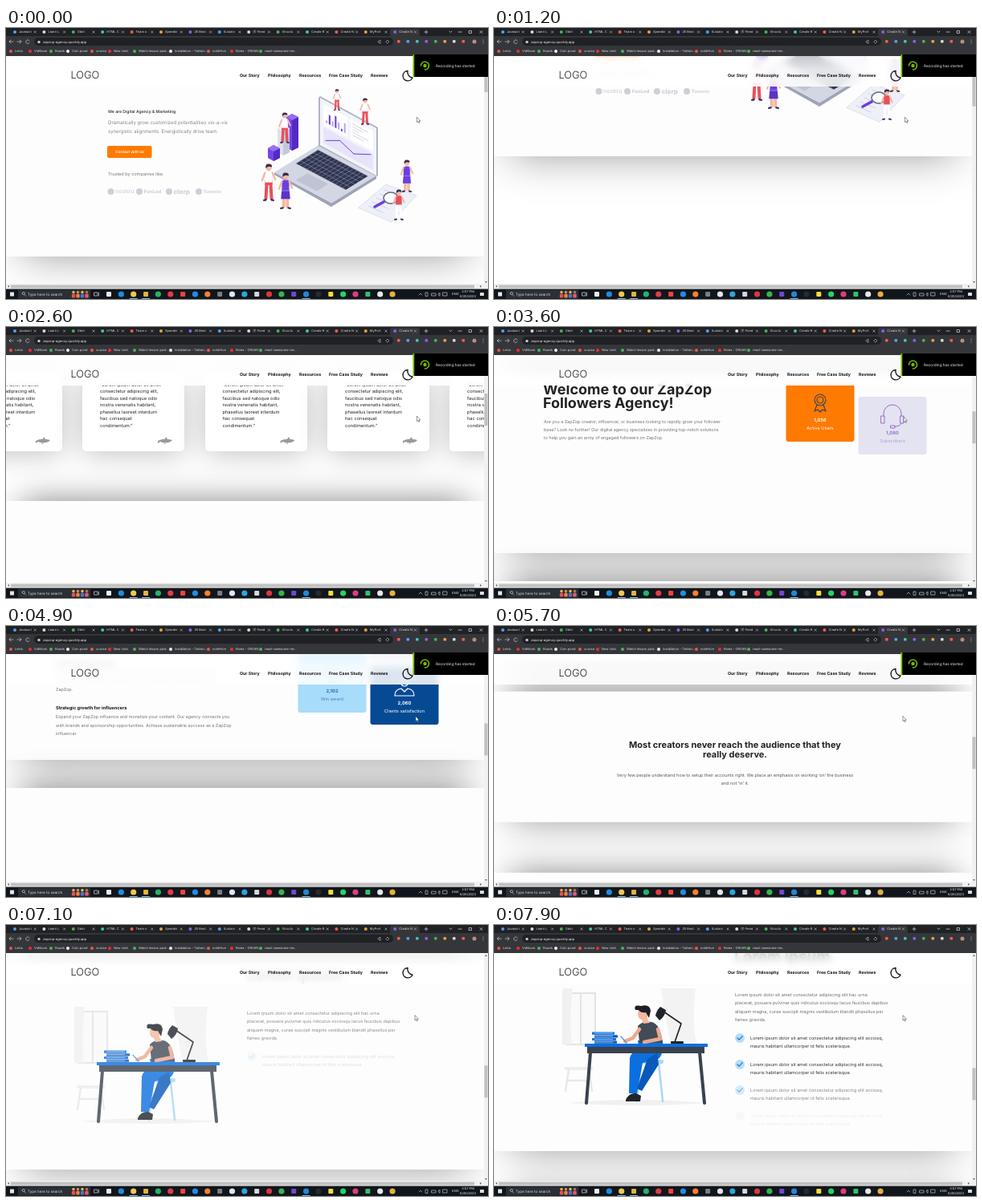
Animation of 600 by 338 pixels, one loop 8000 ms. Source, as an HTML page:

```html
<!DOCTYPE html>
<html lang="en">
<head>
<meta charset="utf-8">
<title>Agency page scroll</title>
<style>
html, body { margin: 0; width: 100%; height: 100%; overflow: hidden; background: #fff; }
#stage { position: relative; width: 600px; height: 338px; overflow: hidden; }
svg { position: absolute; left: 0; top: 0; overflow: visible; font-family: Inter, "Open Sans", sans-serif; text-rendering: geometricPrecision; }
#view { position: absolute; left: 0; top: 35px; width: 595px; height: 284px; overflow: hidden; background: #fff; }
#page { position: absolute; left: 0; top: -35px; width: 595px; }
.sec { position: absolute; left: 0; width: 595px; background: #fdfdfd;
  box-shadow: 0 20px 50px -20px rgba(0,0,0,.38), 0 -20px 40px -20px rgba(0,0,0,.45); }
.card { position: absolute; top: 362px; width: 127px; height: 98px; border-radius: 5px; background: #fff; box-shadow: 0 4px 34px rgba(0,0,0,.24); }
#head { position: absolute; left: 0; top: 35px; width: 595px; height: 38px;
  background: linear-gradient(rgba(255,255,255,.7), rgba(255,255,255,.86) 45%); backdrop-filter: blur(4px); }
</style>
</head>
<body>
<div id="stage">
  <div id="view"><div id="page"></div></div>
  <div id="head"></div>
  <svg id="ui" width="600" height="338"></svg>
</div>
<script>
const $ = id => document.getElementById(id);
const T = (x, y, s, size, fill = '#222', weight = 400, anchor = 'start') =>
  `<text x="${x}" y="${y + size * .34}" font-size="${size}" fill="${fill}" font-weight="${weight}" text-anchor="${anchor}">${s}</text>`;
const lines = (x, y, step, list, ...style) => list.map((s, i) => T(x, y + i * step, s, ...style)).join('');
const R = (x, y, w, h, fill, rx = 0) => `<rect x="${x}" y="${y}" width="${w}" height="${h}" rx="${rx}" fill="${fill}"/>`;
const C = (x, y, r, fill) => `<circle cx="${x}" cy="${y}" r="${r}" fill="${fill}"/>`;
const P = (d, fill, stroke = 'none', w = 1) =>
  `<path d="${d}" fill="${fill}" stroke="${stroke}" stroke-width="${w}" stroke-linecap="round" stroke-linejoin="round"/>`;
const line = (d, stroke, w = 1) => P(d, 'none', stroke, w);
const at = (y, s) => `<g transform="translate(0 ${y})">${s}</g>`;
const reveal = (start, time, s) => `<g class="fade" data-start="${start}" data-time="${time}">${s}</g>`;
const count = (start, rate) => `<tspan class="count" data-start="${start}" data-rate="${rate}">0</tspan>`;
const range = (n, f) => Array.from({ length: n }, (_, i) => f(i)).join('');

// Places unit coordinates on a slanted plane.
const plane = (ox, oy, ux, uy, vx, vy) => {
  const pt = (u, v) => `${(ox + u * ux + v * vx).toFixed(1)} ${(oy + u * uy + v * vy).toFixed(1)}`;
  return {
    quad: (u, v, w, h, fill) => P(`M${pt(u, v)}L${pt(u + w, v)}L${pt(u + w, v + h)}L${pt(u, v + h)}Z`, fill),
    seg: (a, b, c, d, color, w) => line(`M${pt(a, b)}L${pt(c, d)}`, color, w)
  };
};

const skin = '#f4b8a2', purple = '#6c3fe0', red = '#e8505b';
const person = (x, y, h, top, legs, skirt) => `<g transform="translate(${x} ${y}) scale(${h / 40})">`
  + line(skirt ? 'M-2 24L-2 37M2 24L2 37' : 'M-2 20L-3 37M2 20L3 37', skirt ? skin : legs, 3.4)
  + P(skirt ? 'M-4 18L4 18L5 29L-5 29Z' : 'M-4 18L4 18L4 23L-4 23Z', legs)
  + P('M-4 9Q0 7 4 9L4 20L-4 20Z', top, '#d9dbe8', .4)
  + line('M-4 10L-7 18M4 10L7 17', skin, 2)
  + line('M-3 38.5L-5 39M3 38.5L5 39', '#3b3560', 2)
  + C(0, 4.5, 3.1, skin) + P('M-3.3 5Q-3.5 0 0 .5Q4 .5 3.3 4Q0 2 -3.3 5Z', '#3a2a4a') + '</g>';

function laptop() {
  const base = plane(389, 146, 72, 38, -55, 34), scr = plane(391, 87, 70, 38, 0, 59);
  const bar = (x, y, h, a, b, c) => P(`M${x} ${y}l7 -4l8 4v${h}l-8 4l-7 -4z`, a)
    + P(`M${x + 7} ${y + 4}l8 -4v${h}l-8 4z`, b) + P(`M${x} ${y}l7 -4l8 4l-8 4z`, c);
  return bar(349, 111, 38, '#7446ea', '#5429c4', '#9470f5') + bar(338, 125, 30, '#dfe1ec', '#c5c8d8', '#eef0f6')
    + bar(326, 150, 12, '#7446ea', '#5429c4', '#9470f5')
    + P('M334 180L334 183L405 223L461 188L461 184L405 218Z', '#9ea3b8')
    + base.quad(0, 0, 1, 1, '#d3d6e3') + base.quad(.07, .1, .86, .5, '#2f3550')
    + range(14, i => base.seg(.07 + i * .0615, .1, .07 + i * .0615, .6, '#9aa0b8', .5))
    + range(6, i => base.seg(.07, .1 + i * .1, .93, .1 + i * .1, '#9aa0b8', .5))
    + base.quad(.32, .67, .36, .26, '#bfc3d4')
    + P('M391 85L463 124L463 185L459 184L389 147L389 87Z', '#aeb3c6')
    + scr.quad(0, 0, 1, 1, '#f3f4fa') + scr.quad(.06, .1, .43, .42, '#fff') + scr.quad(.54, .1, .4, .42, '#fff')
    + scr.quad(.06, .58, .88, .34, '#e7e3fb')
    + range(7, i => scr.quad(.1 + i * .054, .46 - .05 * (i * 3 % 5 + 1), .03, .05 * (i * 3 % 5 + 1), i % 2 ? purple : '#b9a5f3'))
    + range(5, i => scr.seg(.58, .18 + i * .06, .85 - i % 3 * .08, .18 + i * .06, '#bcc0d5', .7))
    + scr.seg(.1, .84, .35, .68, purple, 1) + scr.seg(.35, .68, .6, .8, purple, 1) + scr.seg(.6, .8, .9, .62, purple, 1)
    + P('M439 224L473 195L511 209L480 242Z', '#eef0f7', '#d0d4e2', .7)
    + range(5, i => line(`M${451 + i * 5} ${222 - i * 5}l${18 + i} 8`, '#cbbdf3', .7))
    + line('M470 217L459 223', purple, 3.6) + P('M470 212a9 7 0 1 0 18 0a9 7 0 1 0 -18 0', '#fff', '#656b87', 1.6)
    + person(412, 76, 27, '#fff', red) + person(447, 87, 34, '#fff', red) + person(347, 105, 39, '#fff', red)
    + person(499, 164, 41, purple, purple, 1) + person(327, 169, 47, '#fff', red)
    + person(348, 180, 46, purple, '#5a33c8', 1) + person(489, 201, 39, red, '#fff');
}

const grey = '#cdd0da';
const partner = (x, name, size, weight) => C(x, 204, 4, grey) + T(x + 5.5, 204, name, size, grey, weight);
const hero = T(127, 104, 'We are Digital Agency &amp; Marketing', 5.1, '#222', 500)
  + lines(127, 118, 11, ['Dramatically grow customized potentialities vis-a-vis', 'synergistic alignments. Energistically drive team.'], 6.1, '#666', 300)
  + R(126, 147, 55.5, 15, '#ff7a00', 2) + T(154, 154.5, 'Contact with us', 4.7, '#fff', 600, 'middle')
  + T(127, 182, 'Trusted by companies like:', 5.6, '#555', 300)
  + partner(130.5, 'nookru', 7, 500) + partner(166, 'FunLod', 6, 800) + partner(203, 'clorp', 8, 800) + partner(240, 'Tunevio', 5.8, 700)
  + laptop();

const shark = x => `<g transform="translate(${x} 142)">` + P('M-9 0Q-2 -4 9 -1L7 1Q0 4 -6 1L-9 3Z M-1 -2L2 -5L3 -1Z M0 2L-2 4.5L3 2Z', '#9a9a9a') + '</g>';
const cardX = [-57, 95, 247.5, 400, 552];
const quote = ['“Lorem ipsum dolor sit amet', 'consectetur adipiscing elit,', 'faucibus sed natoque odio', 'nostra venenatis habitant,',
  'phasellus laoreet interdum', 'hac consequat', 'condimentum.”'];
const quotes = cardX.map(x => lines(x + 22, 72, 8.5, quote, 5.7, '#222') + shark(x + 103)).join('');

const stat = (x, y, bg, ink, n, label, icon, soft = ink) => R(x, y, 85, 72, bg, 3)
  + `<g transform="translate(${x + 42.5} ${y + 24})">${icon}</g>` + T(x + 42.5, y + 45, n, 5.8, ink, 700, 'middle') + T(x + 42.5, y + 55, label, 5.6, soft, 400, 'middle');
const medal = line('M-7 -4a7 7 0 1 0 14 0a7 7 0 1 0 -14 0M-4 -4a4 4 0 1 0 8 0a4 4 0 1 0 -8 0M-4 2L-7 10L-3 8L0 11L3 8L7 10L4 2', '#33415c', 1.1);
const headset = line('M-11 0V-3A11 11 0 0 1 11 -3V0M-14 0h4v9h-4zM10 0h4v9h-4zM11 9Q10 13 3 13M-2 12h5v3h-5z', '#8a4fc0', 1);
const trophy = line('M-6 -7H6V-1Q5 5 0 5Q-5 5 -6 -1ZM-6 -5H-10Q-9 1 -5 1M6 -5H10Q9 1 5 1M0 5V9M-5 10H5', '#3478c0', 1);
const client = line('M-5 -6a5 6 0 1 0 10 0a5 6 0 1 0 -10 0M-12 12Q-12 4 -4 3L0 7L4 3Q12 4 12 12Z', '#fff', 1.2);
const body = '#707070';
const welcome = reveal(2800, 400, lines(61, 78, 17, ['Welcome to our ZapZop', 'Followers Agency!'], 18, '#222', 700)
    + lines(62, 118, 10.2, ['Are you a ZapZop creator, influencer, or business looking to rapidly grow your follower',
      'base? Look no further! Our digital agency specializes in providing top-notch solutions',
      'to help you gain an army of engaged followers on ZapZop.'], 5.4, body))
  + reveal(2900, 500, stat(363.5, 71, '#ff7a00', '#fff', count(3000, 1.76), 'Active Users', medal))
  + reveal(3100, 600, stat(453.5, 87, '#dfdff0', '#7f55b4', count(3000, 1.8), 'Subscribers', headset, '#a58fc8'))
  + reveal(3700, 500, T(62, 163, 'Custom-tailored strategies', 5.7, '#111', 700)
    + lines(62, 173.5, 10.3, ['We know every creator is different. Our team plans each campaign around your', 'goals, your niche and your audience so you can stand out and grow faster on', 'ZapZop.'], 5.4, body))
  + reveal(3700, 500, stat(363.5, 151, '#a8dcfb', '#2869b4', count(3700, 1.7517), 'Win award', trophy, '#5484ad'))
  + reveal(3900, 500, stat(453.5, 166, '#064a94', '#fff', count(3700, 1.7167), 'Clients satisfaction', client))
  + reveal(4100, 500, T(62, 217.5, 'Strategic growth for influencers', 5.7, '#111', 700)
    + lines(62, 228.5, 10.3, ['Expand your ZapZop influence and monetize your content. Our agency connects you',
      'with brands and sponsorship opportunities. Achieve sustainable success as a ZapZop', 'influencer.'], 5.4, body));

const problem = lines(300, 49, 12, ['Most creators never reach the audience that they', 'really deserve.'], 11, '#222', 700, 'middle')
  + lines(300, 86, 10.5, ['Very few people understand how to setup their accounts right. We place an emphasis on working ‘on’ the business', 'and not ‘in’ it.'], 5.45, '#555', 400, 'middle');

const blue = '#0b6fe0', dark = '#39424d';
const desk = P('M90 85H126V149H90Z', '#fafafa', '#e3e3e3', 2) + line('M108 85V149', '#e3e3e3', 2)
  + P('M208 79H251Q246 120 252 148H220Q212 110 208 79Z', '#f3f3f3') + P('M85 79H98Q93 120 97 149H85Z', '#f1f1f1')
  + P('M92 222Q176 214 262 222Q176 228 92 222Z', '#f0f0f0')
  + R(88, 177, 35, 4, '#ededed') + line('M93 181L89 207M118 181L122 207M92 194H119', '#e8e8e8', 2.5)
  + line('M183 172L178 220M205 172L210 220', '#a9d8f5', 2.5) + R(177, 168, 34, 5, '#a9d8f5', 2)
  + P('M179 144H210Q212 165 201 169L185 172L178 210H168L169 166Q170 158 181 157Z', blue)
  + P('M203 160L191 167L178 204L184 207L205 174Z', '#0959b8')
  + P('M164 218Q168 209 177 210L183 213L182 220H164Z', '#20242b')
  + P('M179 126Q186 119 196 121Q207 123 210 147H181Z', '#424b58')
  + line('M181 130L173 141L163 145M204 130L207 142L187 146', '#eba98e', 4.5)
  + P('M180 103H191V117L194 122L186 123L184 118Q177 117 180 103Z', '#f4b99e')
  + P('M176 106Q173 99 183 101Q194 98 195 107L193 116L189 109Q183 110 180 106Z', '#1d2027')
  + line('M158 139L165 147', '#4b92df', 1.2)
  + R(113, 148, 153, 4, blue) + R(116, 152, 146, 8, dark) + line('M120 159L115 222M256 159L262 222', dark, 4)
  + range(4, i => R(122 + i % 2 * 3, 133.5 + i * 3.7, 28 + i % 3, 3.2, i % 2 ? '#0959b8' : blue, .6) + R(125, 134.6 + i * 3.7, 23, .7, '#bfdcfb'))
  + line('M211 108L233 123L225 146', '#20242b', 1.7) + P('M207 102L214 106Q213 114 206 119L201 113Q202 107 207 102Z', '#20242b') + R(220, 145, 16, 3, '#20242b', 1);
const item = (y, start) => reveal(start, 700, C(306, y, 6, '#b8def7') + line(`M303 ${y}l2.2 2.2l4 -4.5`, '#1874c7', 1.2)
  + lines(319, y, 10, ['Lorem ipsum dolor sit amet consectetur adipiscing elit sociosq,', 'mauris habitant ullamcorper id felis scelerisque.'], 5.55, '#333'));
const about = reveal(6700, 500, desk)
  + reveal(6700, 500, T(299, 40, 'Lorem ipsum', 19, '#222', 700)
    + lines(300, 87, 10.4, ['Lorem ipsum dolor sit amet consectetur adipiscing elit hac urna', 'placerat, posuere pulvinar quis ridiculus sociosqu lacus faucibus dapibus',
      'aliquam magna, curae suscipit magnis vestibulum blandit phasellus per', 'fames gravida.'], 5.5, body))
  + item(141, 7000) + item(174, 7200) + item(206, 7500) + item(238, 7850);

const section = (y, h) => `<div class="sec" style="top:${y}px;height:${h}px"></div>`;
$('page').innerHTML = section(35, 250)
  + `<div class="fade" data-start="1300" data-time="500">${cardX.map(x => `<div class="card" style="left:${x}px"></div>`).join('')}</div>`
  + section(522, 223) + section(780, 163) + section(1006, 259) + section(1320, 250)
  + '<svg width="595" height="1600">' + hero + at(305, reveal(1300, 500, quotes)) + at(463, welcome)
  + at(798, reveal(5200, 500, problem)) + at(983, about) + '</svg>';

const hues = ['#4da3ff', '#e8a33a', '#3dc8b4', '#d9d9d9', '#8a62e8', '#ff5b4f', '#46b35a'];
const tabs = ['Javascri', 'Learn L', 'Odel', 'HTML C', 'Team o', 'Speedin', '25 Best', 'Sustain', '(1) Feed', 'Structu', 'Create R', 'Create N', 'MyPort', 'Create N'];
const marks = [[11, 'Letra'], [35, 'VidNook'], [61, 'Roads'], [82, 'Coin pond'], [112, 'course'], [134, 'New chat'], [165, 'Watch lesson pwd...'],
  [210, 'Installation - Tailwin...'], [257, 'noteHive'], [286, 'Roles - ORVAN'], [322, 'react-awesome-rev...']];
const ico = '#c4c7cc';
const browser = R(0, 0, 600, 10, '#202124') + R(478, 1, 37, 10, '#35363a', 2) + R(0, 10, 600, 25, '#35363a')
  + tabs.map((s, i) => { const x = 11 + i * 36.4; return C(x, 5, 2, hues[i * 3 % 7]) + T(x + 5, 5, s, 4, '#dadce0') + line(`M${x + 24} 3.8l2.4 2.4m0 -2.4l-2.4 2.4`, ico, .6); }).join('')
  + line('M521 5h4m-2 -2v4M552 4l1.5 1.5l1.5 -1.5M563 5h4M576.5 3.5h3v3h-3zM590 3.5l3 3m0 -3l-3 3', '#ddd', .7)
  + line('M9 17H4l2 -2m-2 2l2 2M14 17h5l-2 -2m2 2l-2 2M29 16a2.3 2.3 0 1 0 0 2.4', ico, .7)
  + R(35, 12, 447, 10, '#202124', 5) + R(39.5, 16, 3, 3, ico, .5)
  + T(46, 17.2, 'zapzop-agency.quorbly.app', 4.1, '#f1f3f4')
  + line('M463 17l3 -2v4zM473 17l2 -2l2 2l-2 2z', ico, .6)
  + range(8, i => R(487 + i * 11.5, 15, 3.6, 3.6, hues[(i * 2 + 5) % 7], 1)) + C(583, 17, 2.5, '#b88f78') + line('M594 15v.1m0 1.9v.1m0 1.9v.1', ico, .9)
  + marks.map(([x, s], i) => C(x - 5, 29, 2, ['#e9574c', '#ff2929', '#45b463', '#f0f0f0'][i % 4]) + T(x, 29, s, 4, '#dadce0')).join('');

const nav = [[291, 'Our Story'], [326, 'Philosophy'], [365, 'Resources'], [402, 'Free Case Study'], [454, 'Reviews']];
const header = T(80.5, 59, 'LOGO', 12.8, '#222', 300) + nav.map(([x, s]) => T(x, 59, s, 5.25, '#111', 700)).join('')
  + line('M500 53.5A6.2 6.2 0 1 0 506 62A6.8 6.8 0 0 1 500 53.5Z', '#161616', 1.4);

const appX = i => 128 + i * 15.35;
const appHues = ['#e9edf0', '#1b8fe0', '#f3c64d', '#e3b33b', '#20b36a', '#e33b42', '#f0443e', '#1f8ce8', '#ff7f2a', '#7b7f85', '#dfe7ee', '#2ea5e0',
  '#d8d8d8', '#e0343f', '#37b64a', '#7346d1', '#2189d8', '#262b31', '#f7de34', '#25d366', '#e23c7c', '#2fc46c', '#e8e8e8', '#e8b03b'];
const taskbar = R(0, 325.5, 600, 13, '#11161c') + R(5, 329.5, 5, 5, '#e5e5e5') + R(15, 326.5, 90, 11, '#2b3036')
  + line('M20.2 331a1.6 1.6 0 1 0 3.2 0a1.6 1.6 0 1 0 -3.2 0M23 332.5l1.5 1.7', '#ddd', .6) + T(27, 332, 'Type here to search', 4.6, '#ddd')
  + range(4, i => C(84 + i * 5.5, 329.5, 1.7, ['#f3b04e', '#d98662', '#f4bd3f', '#b97450'][i]) + R(81.8 + i * 5.5, 331.5, 4.4, 5, ['#ef4d54', '#e7863b', '#4f70cf', '#e75a71'][i], 1.5))
  + line('M110 330h4v4h-4zM115.5 330v4', '#ddd', .7)
  + appHues.map((f, i) => i % 3 ? C(appX(i), 332, 3.6, f) : R(appX(i) - 3, 329, 6, 6, f, 1)).join('')
  + range(3, i => R(appX([2, 3, 16][i]) - 5, 337, 10, 1, '#76b9ed'))
  + line('M514 333l2 -2l2 2M522 334v-4h3v4zM530 331h5v3h-5zM538 332l2 -2v4zM544 330h5v4h-5z', '#ddd', .6)
  + T(559.5, 332, 'ENG', 4, '#eee', 400, 'middle') + T(575, 329, '3:57 PM', 4, '#eee', 400, 'middle') + T(575, 335, '6/25/2023', 4, '#eee', 400, 'middle') + R(590, 330, 5, 4, '#ddd', .6);

$('ui').innerHTML = browser + header
  + R(595, 35, 5, 284, '#f1f1f1') + P('M596 39l1.5 -2l1.5 2zM596 316l1.5 2l1.5 -2z', '#666') + `<g id="thumb">${R(595.5, 40, 4, 40, '#c1c1c1')}</g>`
  + R(0, 319, 600, 6.5, '#f1f1f1') + R(6, 320.5, 577, 4, '#c1c1c1') + P('M4 320.8v3l-2 -1.5zM590 320.8v3l2 -1.5z', '#666')
  + taskbar
  + `<g id="note">${R(507, 33, 93, 28, '#000') + R(506.5, 33, 1.8, 28, '#76b900')
    + line('M516.5 47a5 5 0 1 1 5 5', '#76b900', 1.6) + C(521.5, 47, 2.2, '#76b900') + T(535, 47, 'Recording has started', 4.7, '#eee')}</g>`
  + `<g id="cursor">${P('M0 -3V3L1.4 1.8L2.4 4L3.3 3.6L2.4 1.5H4Z', '#fff', '#333', .5)}</g>`;

const clamp = v => Math.max(0, Math.min(1, v));
function track(keys, t) {
  const i = Math.max(1, keys.findIndex(k => k[0] >= t));
  const [a, b] = [keys[i - 1], keys[i]];
  return a[1] + (b[1] - a[1]) * clamp((t - a[0]) / (b[0] - a[0]));
}
const scroll = [[0, 0], [300, 0], [1200, 125], [2600, 305], [3600, 463], [4300, 485], [4900, 578], [5500, 690], [6100, 715], [6200, 715], [6500, 798], [7100, 960], [7900, 983]];
const fades = document.querySelectorAll('.fade'), counts = document.querySelectorAll('.count');
const move = (id, x, y) => $(id).setAttribute('transform', `translate(${x} ${y})`);

function draw(now) {
  const t = Math.floor(now % 8000 / 100) * 100; // ten pictures per second
  const y = track(scroll, t);
  $('page').style.transform = `translateY(${-y}px)`;
  move('thumb', 0, y / 7.1);
  move('note', 95 * clamp((t - 5700) / 200), 0);
  move('cursor', track([[0, 511.5], [2700, 511.5], [3500, 510], [5000, 510], [5600, 509], [8000, 509]], t), track([[0, 114.5], [2700, 114.5], [3500, 115.5], [8000, 116]], t));
  for (const e of fades) e.style.opacity = clamp((t - e.dataset.start) / e.dataset.time);
  for (const e of counts) e.textContent = Math.round(Math.max(0, Math.min(2500, (t - e.dataset.start) * e.dataset.rate))).toLocaleString('en-US');
  requestAnimationFrame(draw);
}
requestAnimationFrame(draw);
</script>
</body>
</html>
```
